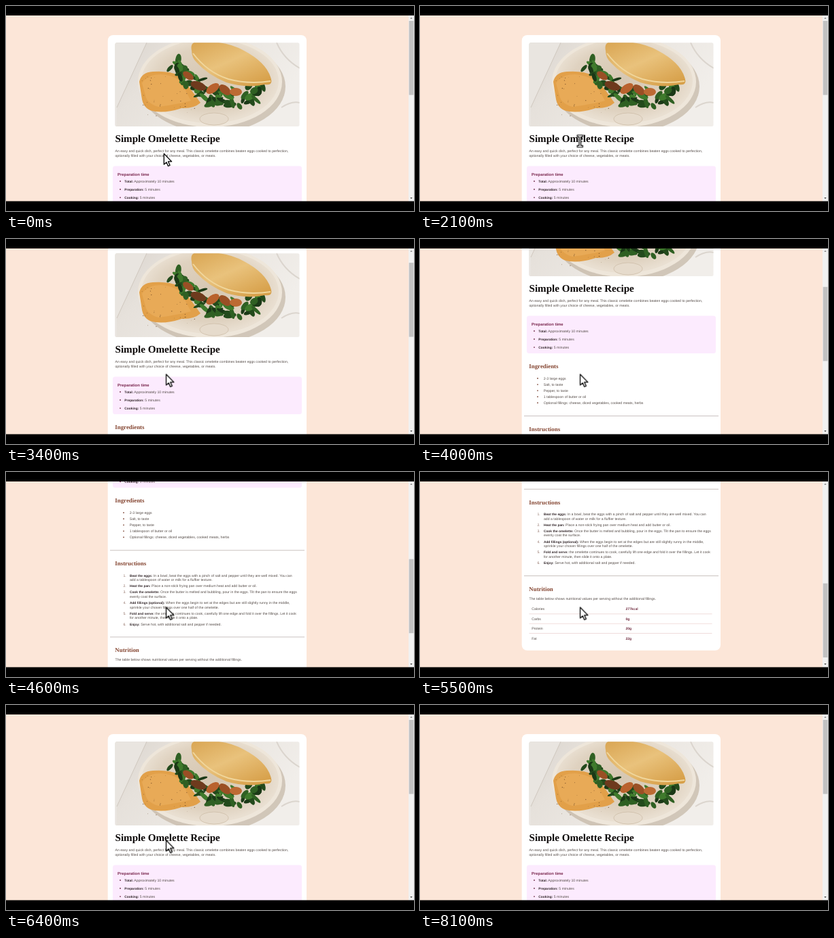
These frames come from a looping animation (600 px wide and 303 px high, 8200 ms). An HTML page:

```html
<!DOCTYPE html>
<html lang="en">
<head>
<meta charset="utf-8">
<title>Simple Omelette Recipe</title>
<style>
  @property --s { syntax: "<number>"; inherits: true; initial-value: 0; }
  html, body { margin: 0; width: 100%; height: 100%; overflow: hidden; background: #000; }
  svg { display: block; width: 600px; height: 303px; }
  text {
    font: 5.17px "Liberation Sans", Arial, sans-serif;
    fill: #564d49; text-rendering: geometricPrecision; white-space: pre;
  }
  .b { font-weight: 700; font-size: 4.86px; fill: #312528; }
  .h { font: 700 8.9px "Liberation Serif", "Times New Roman", serif; fill: #854632; }
  .h1 { font-size: 15.1px; fill: #0c0808; }
  .prep { font-size: 5.92px; font-weight: 700; fill: #7a284e; }
  .num { text-anchor: end; fill: #8d6c61; }
  .val { font-weight: 700; font-size: 5px; fill: #6f2a3e; }

  #stage, #mouse, #arrow, #beam { animation: 8.2s linear infinite paused; }
  #stage { animation-name: scroll; }
  #page { transform: translateY(calc(var(--s) * -1px)); }
  #thumb { transform: translateY(calc(var(--s) * .397px)); }
  #mouse { animation-name: move; }
  #arrow { animation-name: arrow; animation-timing-function: step-end; }
  #beam { animation-name: beam; animation-timing-function: step-end; }

  @keyframes scroll {
    0% { --s: 0; }
    29.268% { --s: 0; animation-timing-function: cubic-bezier(.4, .05, .85, .55); }
    41.463% { --s: 33; animation-timing-function: cubic-bezier(.33, .24, .67, .58); }
    48.78% { --s: 123; animation-timing-function: cubic-bezier(.33, .29, .8, 1); }
    62.195% { --s: 364; }
    65.854% { --s: 364; animation-timing-function: cubic-bezier(.6, 0, .4, 1); }
    76.829%, 100% { --s: 0; }
  }
  @keyframes move {
    0% { transform: translate(232px, 218px); }
    14.634% { transform: translate(232px, 218px); animation-timing-function: ease-in-out; }
    20.732% { transform: translate(236px, 166px); animation-timing-function: ease-in-out; }
    25.61% { transform: translate(235.3px, 199.7px); }
    82.927% { transform: translate(235.3px, 199.7px); animation-timing-function: cubic-bezier(.5, 0, .75, .7); }
    91.463%, 100% { transform: translate(604px, 50px); }
  }
  @keyframes arrow {
    0% { opacity: 1; }
    1.21% { opacity: 0; }
    18.28% { opacity: 1; }
    24.38% { opacity: 0; }
    31.7% { opacity: 1; }
    91.4%, 100% { opacity: 0; }
  }
  @keyframes beam {
    0% { opacity: 0; }
    1.21% { opacity: 1; }
    18.28% { opacity: 0; }
    24.38% { opacity: 1; }
    31.7%, 100% { opacity: 0; }
  }
</style>
</head>
<body>
<svg id="stage" viewBox="0 0 600 303">
  <defs>
    <clipPath id="frame"><rect x="160.5" y="54.3" width="271" height="123.7" rx="2.5"/></clipPath>
    <linearGradient id="marble" x2="1" y2=".4">
      <stop stop-color="#d9d3cc"/><stop offset=".3" stop-color="#e6e1db"/><stop offset="1" stop-color="#f1eeea"/>
    </linearGradient>
    <radialGradient id="plate" cx=".5" cy=".48">
      <stop stop-color="#d6c7b2"/><stop offset=".75" stop-color="#dfd2c0"/><stop offset="1" stop-color="#e9dfd1"/>
    </radialGradient>
    <linearGradient id="egg" x2=".8" y2="1">
      <stop stop-color="#d9a552"/><stop offset=".5" stop-color="#e9c27c"/><stop offset="1" stop-color="#d7a04a"/>
    </linearGradient>
  </defs>

  <rect width="600" height="303" fill="#fce6d8"/>
  <g id="page">
    <rect x="149.7" y="43" width="292.3" height="580" rx="8" fill="#fff"/>

    <g clip-path="url(#frame)">
      <rect x="160" y="54" width="272" height="125" fill="url(#marble)"/>
      <path d="M160 54H207L163 150V178H160Z" fill="#e9e5e0"/>
      <path d="M207 54 163 150" stroke="#c9c1b7" stroke-width=".8"/>
      <path d="M398 54 Q408 78 432 92M405 150Q420 140 432 143" stroke="#dbd5ce" stroke-width="2" fill="none"/>
      <ellipse cx="304" cy="119" rx="107" ry="68" fill="#b9a893" opacity=".55"/>
      <ellipse cx="300" cy="112" rx="106" ry="67" fill="#eee6da"/>
      <ellipse cx="300" cy="111" rx="101" ry="62" fill="url(#plate)"/>
      <ellipse cx="306" cy="167" rx="21" ry="9" fill="#e6dbcc" stroke="#cdbda7" stroke-width=".8"/>
      <path d="M196 112Q199 98 216 97Q240 95 258 104L286 143Q276 152 258 151Q238 158 220 156Q203 154 200 138Z" fill="#e2a049"/>
      <path d="M200 114Q208 101 228 101Q244 102 256 110L272 140Q250 146 224 149Q207 144 205 132Z" fill="#e8aa57"/>
      <g id="greens"></g>
      <g fill="#9a4f25">
        <ellipse cx="268" cy="103" rx="9" ry="5" transform="rotate(35 268 103)"/>
        <ellipse cx="283" cy="118" rx="12" ry="6" transform="rotate(20 283 118)" fill="#6e3a1d"/>
        <ellipse cx="304" cy="122" rx="11" ry="6" transform="rotate(-35 304 122)" fill="#b9622d"/>
        <ellipse cx="322" cy="124" rx="10" ry="6" transform="rotate(40 322 124)"/>
        <ellipse cx="338" cy="127" rx="9" ry="6" fill="#bd6a33"/>
      </g>
      <path d="M273 66Q270 52 284 53Q324 51 350 66Q382 83 389 105Q394 118 381 116Q354 122 324 113Q296 101 281 84Q273 77 273 66Z" fill="url(#egg)"/>
      <path d="M275 70Q296 98 327 108Q356 116 389 111" fill="none" stroke="#f0d69c" stroke-width="2"/>
      <g id="pepper" fill="#5d3a1d"></g>
    </g>

    <text class="h h1" x="160.5" y="201">Simple Omelette Recipe</text>
    <text x="160.5" y="216">An easy and quick dish, perfect for any meal. This classic omelette combines beaten eggs cooked to perfection,</text>
    <text x="160.5" y="222.6">optionally filled with your choice of cheese, vegetables, or meats.</text>

    <rect x="157" y="236.4" width="278" height="55.6" rx="3.5" fill="#fcebfe"/>
    <text class="prep" x="164" y="251.1">Preparation time</text>
    <g fill="#6f2a4a"><circle cx="168" cy="259" r=".9"/><circle cx="168" cy="271" r=".9"/><circle cx="168" cy="283.1" r=".9"/></g>
    <text x="174.3" y="260.7"><tspan class="b">Total:</tspan> Approximately 10 minutes</text>
    <text x="174.3" y="272.7"><tspan class="b">Preparation:</tspan> 5 minutes</text>
    <text x="174.3" y="284.8"><tspan class="b">Cooking:</tspan> 5 minutes</text>

    <text class="h" x="160.3" y="314">Ingredients</text>
    <g id="ingredients"></g>

    <path d="M153 384.6H439M153 512.7H439" stroke="#c9c1bf"/>
    <text class="h" x="160.3" y="407">Instructions</text>
    <g id="steps"></g>

    <text class="h" x="160.3" y="535">Nutrition</text>
    <text x="160.5" y="547.9">The table below shows nutritional values per serving without the additional fillings.</text>
    <path d="M160.5 569H429.5M160.5 583.4H429.5M160.5 597.7H429.5" stroke="#ecd3d2" stroke-width=".8"/>
    <g id="table"></g>
  </g>

  <rect x="592" y="14" width="8" height="275" fill="#f1f1f1"/>
  <rect id="thumb" x="592.7" y="22" width="6.6" height="109.5" fill="#c1c1c1"/>
  <path d="M594.3 19 596 16.8 597.7 19Z" fill="#8a8a8a"/>
  <path d="M594.3 283 596 285.2 597.7 283Z" fill="#505050"/>

  <g id="mouse" stroke="#000" fill="#fff" stroke-linejoin="round">
    <path id="arrow" stroke-width="1.3" d="M.3 .3V16.2L4 12.9 6.5 18.7 9.1 17.5 6.6 11.9H11.6Z"/>
    <path id="beam" stroke-width="1.2" d="M-4-9H4V-6.4H1.3V6.4H4V9H-4V6.4H-1.3V-6.4H-4Z"/>
  </g>

  <path d="M0 0H600V14H0ZM0 288.4H600V303H0Z"/>
</svg>
<script>
  const LOOP = 8200, STEP = 100;
  const $ = id => document.getElementById(id);
  const text = (x, y, body, cls = "") => `<text class="${cls}" x="${x}" y="${y}">${body}</text>`;
  const bold = s => `<tspan class="b">${s}</tspan>`;

  $("ingredients").innerHTML = [
    "2-3 large eggs", "Salt, to taste", "Pepper, to taste", "1 tablespoon of butter or oil",
    "Optional fillings: cheese, diced vegetables, cooked meats, herbs"
  ].map((s, i) => {
    const y = 329 + i * 9.05;
    return `<circle cx="173" cy="${y}" r=".9" fill="#7d4636"/>` + text(181.7, y + 1.8, s);
  }).join("");

  const steps = [
    [421.5, "Beat the eggs:", "In a bowl, beat the eggs with a pinch of salt and pepper until they are well mixed. You can", "add a tablespoon of water or milk for a fluffier texture."],
    [437, "Heat the pan:", "Place a non-stick frying pan over medium heat and add butter or oil."],
    [446.3, "Cook the omelette:", "Once the butter is melted and bubbling, pour in the eggs. Tilt the pan to ensure the eggs", "evenly coat the surface."],
    [462, "Add fillings (optional):", "When the eggs begin to set at the edges but are still slightly runny in the middle,", "sprinkle your chosen fillings over one half of the omelette."],
    [477.9, "Fold and serve:", "the omelette continues to cook, carefully lift one edge and fold it over the fillings. Let it cook", "for another minute, then slide it onto a plate."],
    [493.5, "Enjoy:", "Serve hot, with additional salt and pepper if needed."]
  ];
  $("steps").innerHTML = steps.map(([y, name, first, second], i) =>
    text(176.8, y + 1.8, i + 1 + ".", "num") +
    text(181.9, y + 1.8, bold(name) + " " + first) +
    (second ? text(181.9, y + 8.3, second) : "")
  ).join("");

  $("table").innerHTML = [["Calories", "277kcal"], ["Carbs", "0g"], ["Protein", "20g"], ["Fat", "22g"]]
    .map(([name, value], i) => {
      const y = 563.7 + i * 14.35;
      return text(164.2, y, name) + text(302.5, y, value, "val");
    }).join("");

  // Seeded garnish: leaves along the filling, pepper over the plate.
  let seed = 7;
  const rnd = () => (seed = seed * 16807 % 2147483647) / 2147483647;
  const spread = r => (rnd() - .5) * 2 * r;
  const spine = [[252, 82], [262, 104], [300, 132], [338, 139], [374, 122]];
  const greens = ["#234a1c", "#2f6023", "#3f7a2c", "#1b3917"];
  let leaves = "", pepper = "";
  for (let i = 0; i < 62; i++) {
    const u = i / 62 * 4, k = Math.floor(u), f = u - k;
    const at = n => spine[k][n] + (spine[k + 1][n] - spine[k][n]) * f;
    const x = at(0) + spread(11), y = at(1) + spread(12);
    leaves += `<ellipse cx="${x}" cy="${y}" rx="${5 + rnd() * 5}" ry="${2 + rnd() * 3}" fill="${greens[i % 4]}" transform="rotate(${rnd() * 180} ${x} ${y})"/>`;
  }
  for (let i = 0; i < 45; i++)
    pepper += `<circle cx="${240 + spread(40)}" cy="${134 + spread(32)}" r="${.25 + rnd() * .35}"/>`;
  $("greens").innerHTML = leaves;
  $("pepper").innerHTML = pepper;

  const motions = document.getAnimations();
  const start = performance.now();
  function tick(now) {
    const t = Math.floor(Math.max(0, now - start) % LOOP / STEP) * STEP;
    for (const m of motions) m.currentTime = t;
    requestAnimationFrame(tick);
  }
  requestAnimationFrame(tick);
</script>
</body>
</html>
```
